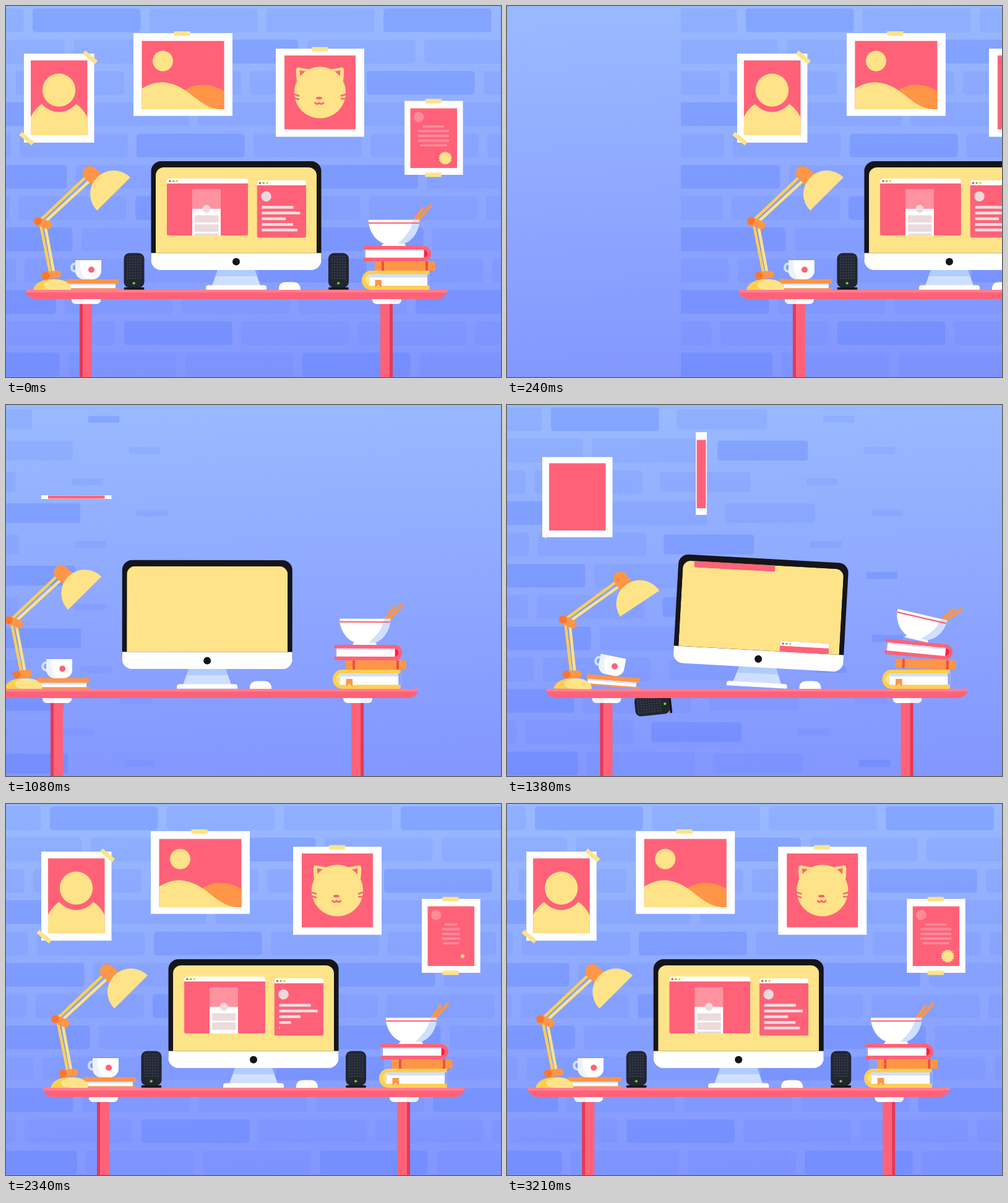
Recreate the animation shown at these times as an HTML page with a canvas. Size 800x600 px, loop 3.24 s.

```html
<!DOCTYPE html>
<html lang="en">
<head>
<meta charset="utf-8">
<title>Desk</title>
<style>
html, body { margin: 0; width: 100%; height: 100%; overflow: hidden; background: #8fa9ff; }
canvas { display: block; }
</style>
</head>
<body>
<canvas id="stage" width="800" height="600"></canvas>
<script>
const c = document.getElementById('stage').getContext('2d');
const LOOP = 3240, STEP = 30;
const RED = '#ff6278', PINK = '#ff8c9a', SUN = '#ffe388', GOLD = '#ffce51', ORANGE = '#ff9547',
  EMBER = '#ff752b', ICE = '#cfe0ff', MIST = '#eef2fa', WHITE = '#fff', INK = '#151519', PAPER = '#ecdadc';
let T = 0;

// Timing
const ease = u => u < .5 ? 2 * u * u : 1 - 2 * (1 - u) ** 2;
const grow = (start, dur = 450) => ease(Math.min(1, Math.max(0, (T - start) / dur)));
function keys(list) {
  let v = list[0][1];
  for (let i = 1; i < list.length; i++) {
    const [t0, a] = list[i - 1], [t1, b] = list[i];
    if (T >= t0) v = a + (b - a) * grow(t0, t1 - t0);
  }
  return v;
}

// Drawing
function saved(fn) { c.save(); fn(); c.restore(); }
function fill(color) { c.fillStyle = color; c.fill(); }
function box(x, y, w, h, color, r = 0) {
  c.beginPath();
  c.roundRect(x, y, w, h, r);
  fill(color);
}
function oval(x, y, rx, color, ry = rx) {
  c.beginPath();
  c.ellipse(x, y, rx, ry, 0, 0, 7);
  fill(color);
}
function shape(d, color) { c.fillStyle = color; c.fill(new Path2D(d)); }
function line(d, width, color, cap = 'butt') {
  c.lineWidth = width;
  c.strokeStyle = color;
  c.lineCap = cap;
  c.stroke(new Path2D(d));
}
function shift(x, y, fn) { saved(() => { c.translate(x, y); fn(); }); }
function turn(x, y, deg, fn) {
  saved(() => {
    c.translate(x, y);
    c.rotate(deg * Math.PI / 180);
    c.translate(-x, -y);
    fn();
  });
}
function scale(x, y, sx, sy, fn) {
  if (sx <= 0 || sy <= 0) return;
  saved(() => {
    c.translate(x, y);
    c.scale(sx, sy);
    c.translate(-x, -y);
    fn();
  });
}
const pop = (x, y, start, fn) => scale(x, y, grow(start), grow(start), fn);
function clip(x, y, w, h, r, fn) {
  saved(() => {
    c.beginPath();
    c.roundRect(x, y, w, h, r);
    c.clip();
    fn();
  });
}
// Tips an object over whichever bottom corner it leans on
const rock = (deg, left, right, y, fn) => turn(deg > 0 ? right : left, y, deg, fn);

// Wall
const rowX = [71, 137, 44, 149, 50, 141, 48, 150, 58, 123, 30, 129];
const darkCols = ['14', '2', '4', '0', '2', '03', '2', '03', '3', '04', '2', '03'];

function background() {
  const g = c.createLinearGradient(387, 0, 413, 600);
  g.addColorStop(0, '#99b9ff');
  g.addColorStop(1, '#8397ff');
  c.fillStyle = g;
  c.fillRect(0, 0, 800, 600);
}
function wall() {
  clip(-34, 0, 900, 600, 0, () => rowX.forEach((x0, row) => {
    for (let col = 0; col < 6; col++) {
      const x = x0 + (col - 1) * 189, y = 4 + row * 50.6;
      const color = darkCols[row].includes(col) ? 'rgba(79,116,255,.27)' : 'rgba(79,116,255,.13)';
      pop(x + 87, y + 19, 759 + col * 150, () => box(x, y, 174.5, 38.3, color, 5));
    }
  }));
}

// Pictures
function tape(x, y, start, deg = 0) {
  pop(x, y, start, () => turn(x, y, deg, () => box(x - 13, y - 3.5, 26, 7, SUN)));
}
function picture(x, y, w, h, [ix, iy, iw, ih], start, wide, content) {
  const k = grow(start, 475);
  scale(x + w / 2, y + h / 2, wide ? k : k && 1, wide ? k && 1 : k, () => {
    box(x, y, w, h, WHITE);
    box(ix, iy, iw, ih, RED);
  });
  clip(ix, iy, iw, ih, 0, content);
}
function portrait() {
  picture(57, 77, 113.5, 144, [68, 88, 91.5, 121], 1012, false, () => {
    shift(0, 65 * (1 - grow(1440)), () => oval(113.5, 200, 50, SUN));
    pop(113.5, 136, 1362, () => {
      oval(113.5, 136, 35.5, RED);
      oval(113.5, 136, 26.7, SUN);
    });
  });
  tape(61.5, 214.5, 1240, 40);
  tape(164, 83, 1380, 40);
}
function landscape() {
  picture(234, 44, 160, 133.7, [247.5, 56.5, 133, 110.5], 1268, true, () => {
    pop(281.5, 89, 1600, () => oval(281.5, 89, 16.5, SUN));
    shift(0, 45 * (1 - grow(1760)), () => shape('M300 170V150C318 132 334 127 348 127.5Q366 128 381 138V170Z', ORANGE));
    shift(0, 48 * (1 - grow(1660)), () => shape('M247 170V134C262 124 278 121 292 125C326 132 340 165 374 167V170Z', SUN));
  });
  tape(312.5, 44.5, 1640);
}
function cat() {
  picture(464, 69, 143, 142.5, [478, 80, 115, 119.5], 1560, false, () => pop(535.5, 140, 1850, () => {
    for (const side of [1, -1]) scale(535.5, 0, side, 1, () => 0), saved(() => {
      c.translate(535.5, 0);
      c.scale(side, 1);
      shape('M-36 130Q-40 108 -38 101Q-37 99 -34 99.500L-14 103Z', SUN);
      shape('M-33 104L-22 106Q-30 110 -32 115Z', RED);
    });
    oval(535.5, 140, 41.7, SUN);
    oval(534, 149, 5, RED, 2.2);
    line('M527.500 155.500Q528 158.500 531 158.300Q534 158 534 155.500Q534.500 158 537.500 158.300Q540.500 158.500 541 155.500', 2.7, RED);
    line('M493 142.500L502 145.500M494 149L502 151.500M578 142.500L569 145.500M577.500 150L569 150', 2.7, RED);
  }));
  tape(535, 70, 1890);
}
function certificate() {
  picture(672, 153.500, 94.500, 119.500, [681.500, 165.500, 75.500, 96.500], 1850, true, () => {
    pop(695, 179.500, 1890, () => oval(695, 179.500, 8.200, PINK));
    [34, 50, 50, 50, 43].forEach((w, i) => {
      scale(719, 0, grow(2080, 475), 1, () => box(719 - w / 2, 193 + i * 7.600, w, 3.700, PINK));
    });
    pop(738, 246, 2165, () => {
      c.beginPath();
      for (let a = 0; a < 6.283; a += .05) {
        const r = 10 + .9 * Math.cos(a * 16);
        c.lineTo(738 + r * Math.cos(a), 246 + r * Math.sin(a));
      }
      fill(SUN);
    });
  });
  tape(718.500, 153.800, 1880);
  tape(718.500, 273, 1880);
}

// Speakers leap up from behind the desk
function speaker(x, delay, spin) {
  const left = Math.max(0, 1659 + delay - T);
  const dy = left ? -70 + .00496 * (left - 119) ** 2 : 0;
  if (dy > 260) return;
  shift(0, dy, () => turn(x, 428, -.344 * spin * left, () => {
    box(x - 16.300, 455, 32.600, 3.700, INK, 1);
    box(x - 16.500, 399.500, 33, 56, '#212631', 9);
    for (let i = 0; i < 6; i++) {
      for (let j = 0; j < 9; j++) oval(x - 10.500 + i * 4.200, 405 + j * 4.400, 1.500, '#353b49');
    }
    oval(x - .300, 448.300, 2.100, '#5fe010');
  }));
}

// Things on the desk
function desk() {
  box(147, 470, 20, 130, RED);
  box(147, 470, 5, 130, '#e23a57');
  box(633, 470, 20, 130, RED);
  box(648, 470, 5, 130, '#e23a57');
  for (const [x, gx] of [[134, 134], [620, 648]]) {
    clip(x, 470, 47, 12, [0, 0, 7, 7], () => {
      box(x, 470, 47, 12, WHITE);
      box(gx, 470, 19, 12, MIST);
    });
  }
  shape('M59 459H742Q738 474 724 474H76Q63 474 59 459Z', RED);
  shape('M59 459H742L740.500 463.300H60.500Z', '#ff8090');
}
function lamp(w) {
  turn(102, 459, w, () => {
    shape('M72 459C75 447 88 442 103 442Q120 442 126 459Z', GOLD);
    shape('M89 451C92 440 124 437 133 454Q134 458 132 459H103Q90 458 89 451Z', SUN);
    turn(92, 436, 3.500 * w, () => {
      line('M84 354L100 434', 4.500, GOLD);
      line('M91 354L105.500 432', 4.500, SUN);
      line('M92 436L111 434', 12, ORANGE, 'round');
      oval(92, 436, 6.300, EMBER);
      turn(79, 348, 2.700 * w, () => {
        line('M83 347L160 274', 4.500, GOLD);
        line('M90 350L166 280', 4.500, SUN);
        turn(163, 271, 4.300 * w, () => {
          line('M163.500 270.500L182 287', 23, ORANGE, 'round');
          c.beginPath();
          c.arc(202, 304, 38, Math.PI * .75, Math.PI * 1.75);
          fill(SUN);
        });
      });
      line('M80 348L96 354.500', 13, ORANGE, 'round');
      oval(79.300, 347.800, 6.400, EMBER);
    });
  });
}
function cupAndBook(w) {
  rock(4.300 * w, 124, 210, 459, () => {
    box(124, 441.700, 86, 7.300, ORANGE);
    box(124, 456.300, 86, 2.700, ORANGE);
    box(126, 449, 79, 7.300, WHITE);
    box(126, 449, 79, 2.500, ICE);
    rock(7 * w, 148, 174, 441.500, () => {
      c.beginPath();
      c.ellipse(139, 423, 5, 6, 0, 0, 7);
      c.lineWidth = 4;
      c.strokeStyle = ICE;
      c.stroke();
      clip(140, 411, 42, 31, [1, 1, 14, 14], () => {
        box(140, 411, 42, 31, WHITE);
        shape('M140 411H148Q147 434 158 442H140Z', MIST);
      });
      oval(166, 426.500, 5, RED);
    });
  });
}
function windowFrame(x, y, w, h, content) {
  clip(x, y, w, h, 3, () => {
    box(x, y, w, h, RED);
    box(x, y, w, 8, WHITE);
    ['#ff3b55', '#65d80c', '#ffc21f'].forEach((color, i) => oval(x + 5 + i * 5.700, y + 4.200, 1.700, color));
    content();
  });
}
function screen() {
  const off = 130 * (1 - grow(1219, 475));
  shift(0, -off, () => windowFrame(288, 279, 131, 92.300, () => {
    shift(0, 80 * (1 - grow(1530)), () => {
      box(329, 296, 46, 40, '#ff929f', [2, 2, 0, 0]);
      box(329, 328, 46, 50, WHITE);
      pop(352, 328, 1700, () => oval(352, 328, 6.400, PAPER));
      [1750, 1880, 2370].forEach((start, i) => {
        scale(352, 0, grow(start), 1, () => box(333, 338.500 + i * 14.800, 38.500, 11.800, PAPER));
      });
    });
  }));
  shift(0, off, () => windowFrame(433.500, 282, 79.500, 92.800, () => {
    pop(448.500, 308, 1600, () => oval(448.500, 308, 8.300, PAPER));
    [51, 62, 38.500, 50.500, 57.500].forEach((w, i) => {
      box(441.500, 323.300 + i * 9.200, w * grow(1695 + i * 150), 4.500, '#f1dfe1');
    });
  }));
}
function monitor(w) {
  rock(3.200 * w, 351, 449, 459, () => {
    shape('M370.500 426H429.500L439 452H361Z', ICE);
    shape('M370.500 426H429.500L433.500 437H366.500Z', '#b1cdff');
    box(351, 451.500, 98, 7.300, WHITE, [4, 4, 0, 0]);
    box(262.500, 251, 275, 160, INK, [16, 16, 0, 0]);
    box(262.500, 399.500, 275, 27.500, WHITE, [0, 0, 16, 16]);
    clip(270, 261, 260, 138.500, [13, 13, 0, 0], () => {
      box(270, 261, 260, 139, SUN);
      screen();
    });
    oval(400, 413.500, 6, INK);
  });
  shape('M469 459Q468 446.500 481 446.500H492Q504 446.500 504 459Z', WHITE);
}
function bowl() {
  line('M688 346L702 326.500M694 346L714 323.500', 4.700, ORANGE, 'round');
  shape('M635 388Q636 383 645 382H665Q674 383 674 388Z', WHITE);
  shape('M613.700 345.800H696C696 368 680 384 668 384.500H642C630 384 614 368 613.700 345.800Z', WHITE);
  shape('M696 345.800C696 368 680 384 668 384.500H661C672 375 684 362 686 345.800Z', ICE);
  line('M614 351H695.500', 2.200, RED);
}
function books(w) {
  box(603, 428, 109.500, 31, GOLD, [15, 0, 0, 15]);
  shape('M620 434Q608 436 608 443T620 452.500Z', SUN);
  shape('M614 434H713V452.500H614Q617 443 614 434Z', WHITE);
  shape('M614 434H713V439H615.500Z', ICE);
  box(709, 433.800, 4, 18.800, '#8da5ff');
  shape('M624.500 443H635V455L629.700 451L624.500 455Z', ORANGE);
  rock(1.800 * w, 624, 720, 428, () => {
    box(624, 413, 97.500, 15, ORANGE);
    box(635, 413, 4, 15, '#ef4f42');
    box(706, 413, 4, 15, '#ef4f42');
    rock(3.700 * w, 606, 712, 413, () => {
      box(605.500, 388, 109.500, 25, RED, [2, 12.500, 12.500, 2]);
      box(605, 394, 5, 13, '#8fa8ff');
      shape('M703 394Q709 395 709 400.500T703 407Z', '#ff1f45');
      box(609, 394, 94.500, 13, WHITE);
      box(609, 394, 94.500, 2.500, ICE);
      rock(7.500 * w, 636, 673, 388, bowl);
    });
  });
}

function draw() {
  const clock = Math.floor(performance.now() % LOOP / STEP) * STEP;
  // The exit opens the loop, so it continues the clock of the finished scene
  T = clock < 540 ? clock + LOOP : clock;
  const exit = keys([[3090, 0], [3240, -28], [3780, 840]]);
  const enter = T < 1263 ? 6 - .002415 * (1263 - T) ** 2 : 6 * (1 - grow(1263, 257));
  const sway = keys([[1050, 0], [1380, 1], [1740, -.45], [2040, .15], [2280, 0]]);

  background();
  shift(exit, 0, () => {
    wall();
    portrait();
    landscape();
    cat();
    certificate();
    speaker(235, 0, 1);
    speaker(565.500, 75, -1);
    shift(enter, 0, () => {
      desk();
      cupAndBook(sway);
      lamp(sway);
      monitor(sway);
      books(sway);
    });
  });
  requestAnimationFrame(draw);
}
draw();
</script>
</body>
</html>
```
